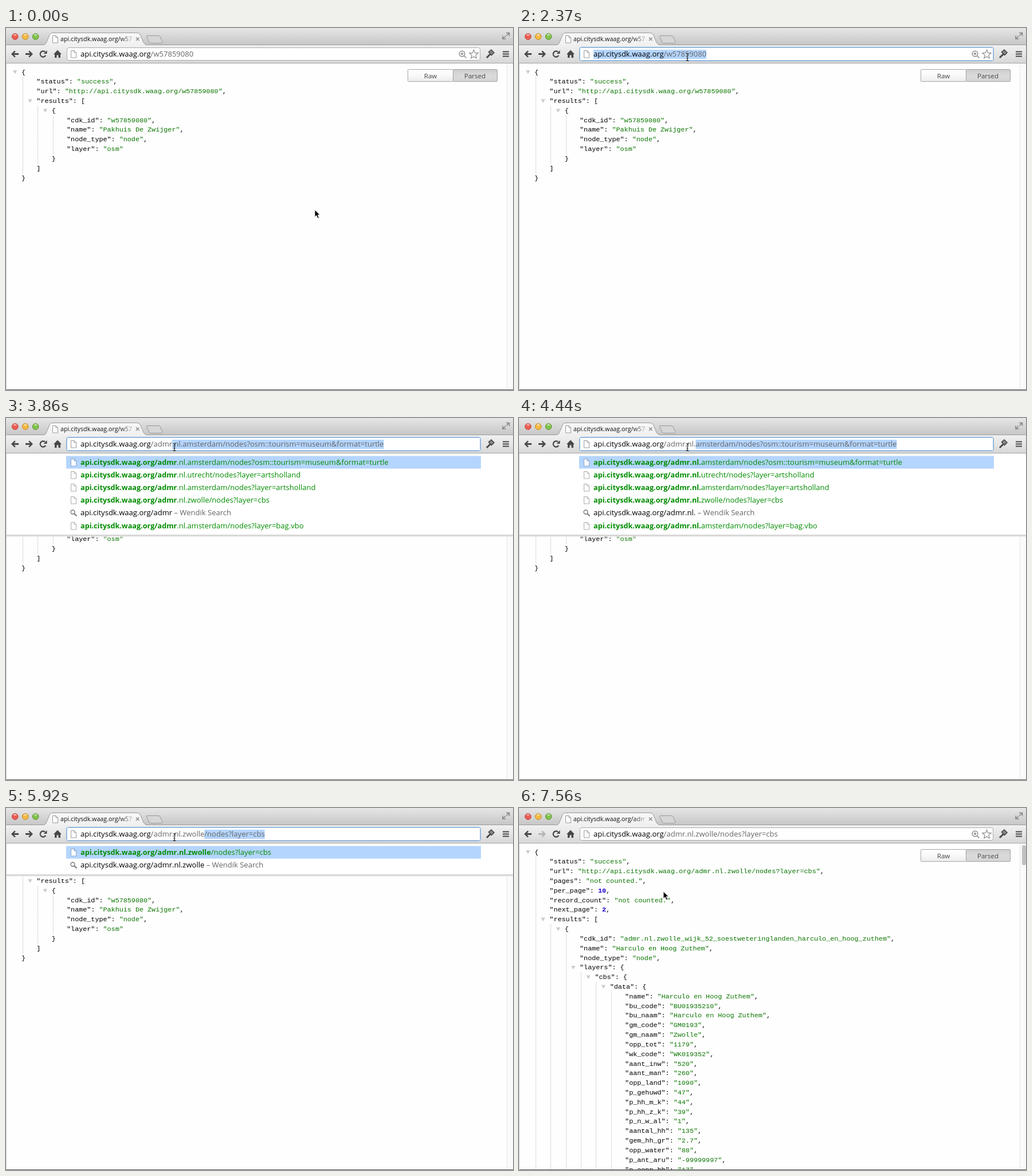
Write an HTML page with a canvas that moves like this. It is 885 by 633 pixels and loops after 8000 ms.

```html
<!DOCTYPE html>
<html lang="en">
<head>
<meta charset="utf-8">
<title>API browser</title>
<style>
  html, body { margin: 0; height: 100%; overflow: hidden; background: #fefefe; }
  canvas { display: block; }
</style>
</head>
<body>
<canvas id="stage" width="885" height="633"></canvas>
<script>
const ctx = document.getElementById('stage').getContext('2d');
const LOOP = 8000;
const UI = '"Open Sans", "Noto Sans", sans-serif';
const URL_FONT = '13.04px ' + UI;
const MATCH_FONT = 'bold 12.65px ' + UI;
const MONO = '11.76px "Liberation Mono", "Courier New", monospace';
const INK = '#484848', GREY = '#646464', GREEN = '#008c00', SELECT = '#b4d5fe';

const HOST = 'api.citysdk.waag.org';
const OLD_PATH = 'w57859080';
const NEW_PATH = 'admr.nl.zwolle/nodes?layer=cbs';
const HISTORY = [
  'admr.nl.amsterdam/nodes?osm::tourism=museum&format=turtle',
  'admr.nl.utrecht/nodes?layer=artsholland',
  'admr.nl.amsterdam/nodes?layer=artsholland',
  NEW_PATH,
  'admr.nl.amsterdam/nodes?layer=bag.vbo'
];

// Leading spaces give the nesting level.
const OLD_JSON = `{
 "status": "success",
 "url": "http://${HOST}/${OLD_PATH}",
 "results": [
  {
   "cdk_id": "w57859080",
   "name": "Pakhuis De Zwijger",
   "node_type": "node",
   "layer": "osm"
  }
 ]
}`.split('\n');

const FIELDS = {
  name: 'Harculo en Hoog Zuthem', bu_code: 'BU01935210', bu_naam: 'Harculo en Hoog Zuthem',
  gm_code: 'GM0193', gm_naam: 'Zwolle', opp_tot: '1179', wk_code: 'WK019352',
  aant_inw: '520', aant_man: '260', opp_land: '1090', p_gehuwd: '47', p_hh_m_k: '44',
  p_hh_z_k: '39', p_n_w_al: '1', aantal_hh: '135', gem_hh_gr: '2.7', opp_water: '88',
  p_ant_aru: '-99999997', p_eenp_hh: '17'
};
const NEW_JSON = `{
 "status": "success",
 "url": "http://${HOST}/${NEW_PATH}",
 "pages": "not counted.",
 "per_page": 10,
 "record_count": "not counted.",
 "next_page": 2,
 "results": [
  {
   "cdk_id": "admr.nl.zwolle_wijk_52_soestweteringlanden_harculo_en_hoog_zuthem",
   "name": "Harculo en Hoog Zuthem",
   "node_type": "node",
   "layers": {
    "cbs": {
     "data": {`.split('\n').concat(
  Object.entries(FIELDS).map(([key, value]) => `      "${key}": "${value}",`));

// [time, x, y]
const POINTER = [
  [0, 539, 318], [300, 533, 311], [450, 506, 282], [590, 467, 240], [740, 432, 203],
  [890, 415, 186], [1340, 394, 163], [1490, 368, 135], [1630, 338, 100], [1780, 312, 70],
  [1930, 298, 51], [2070, 294, 51], [7410, 276, 100], [7560, 252, 146]
];
// [time, text typed after the host]
const TYPED = [
  [2960, 'a'], [3410, 'ad'], [3710, 'adm'], [3850, 'admr'], [4000, 'admr.'],
  [4150, 'admr.n'], [4290, 'admr.nl'], [4440, 'admr.nl.'], [4740, 'admr.nl.z'],
  [5030, 'admr.nl.zw'], [5180, 'admr.nl.zwo'], [5470, 'admr.nl.zwol'],
  [5620, 'admr.nl.zwoll'], [5920, 'admr.nl.zwolle']
];
const FOCUS = 2220, SELECTED = 2370, ENTER = 6370, ARRIVED = 6660, DONE = 6810;

const latest = (steps, t) => steps.filter(step => step[0] <= t).pop();

function rect(x, y, w, h, fill) {
  ctx.fillStyle = fill;
  ctx.fillRect(x, y, w, h);
}
function shape(d, fill, stroke, width = 1) {
  const path = new Path2D(d);
  if (fill) { ctx.fillStyle = fill; ctx.fill(path); }
  if (stroke) { ctx.strokeStyle = stroke; ctx.lineWidth = width; ctx.stroke(path); }
}
function arc(x, y, r, from, to, fill, stroke, width = 1) {
  ctx.beginPath();
  ctx.arc(x, y, r, from, to);
  if (fill) { ctx.fillStyle = fill; ctx.fill(); }
  if (stroke) { ctx.strokeStyle = stroke; ctx.lineWidth = width; ctx.stroke(); }
}
const circle = (x, y, r, ...paint) => arc(x, y, r, 0, 2 * Math.PI, ...paint);
function box(x, y, w, h, r, fill, stroke) {
  ctx.beginPath();
  ctx.roundRect(x, y, w, h, r);
  ctx.fillStyle = fill;
  ctx.fill();
  if (stroke) { ctx.strokeStyle = stroke; ctx.lineWidth = 1; ctx.stroke(); }
}
function gradient(x0, y0, x1, y1, ...colors) {
  const g = ctx.createLinearGradient(x0, y0, x1, y1);
  colors.forEach((c, i) => g.addColorStop(i / (colors.length - 1), c));
  return g;
}
// Draws one run and returns where the next begins.
function text(str, x, y, font, color) {
  ctx.font = font;
  ctx.fillStyle = color;
  ctx.fillText(str, x, y);
  return x + ctx.measureText(str).width;
}
function widthOf(str) {
  ctx.font = URL_FONT;
  return ctx.measureText(str).width;
}
const pageIcon = (x, y, color = '#999') =>
  shape(`M${x + .5} ${y + .5}h5.5l3.5 3.5v9h-9zM${x + 6} ${y + .5}v3.5h3.5`, '#fff', color);

function drawJson(lines) {
  const open = [];
  lines.forEach((line, i) => {
    const level = line.search(/\S/);
    const top = 68.6 + 16.82 * i;
    let x = 27 + 26.35 * level;
    if (/^\s*[\]}]/.test(line)) drawGuide(level, open.pop(), top);
    if (/[\[{]$/.test(line)) {
      open.push(top + 16.82);
      shape(`M${x - 15} ${top + 5.5}h7.4l-3.7 6.5z`, '#ccc');
    }
    const parts = line.trim().split(/("[^"]*"|\b\d+\b)/);
    parts.forEach((part, n) => {
      const isToken = n % 2 && !parts[n + 1].startsWith(':');
      const isNumber = isToken && part[0] !== '"';
      const color = isNumber ? '#1a01cc' : isToken ? '#0b7500' : '#000';
      x = text(part, x, Math.round(top + 11.9), (isNumber ? 'bold ' : '') + MONO, color);
    });
  });
  open.forEach((top, level) => drawGuide(level, top, 632));
}
function drawGuide(level, top, bottom) {
  const x = Math.floor(29.3 + 26.4 * level);
  for (let y = Math.round(top); y < bottom; y += 2) rect(x, y, 1, 1, '#bbb');
}

function drawPage(arrived) {
  rect(0, 62, 885, 571, '#fefefe');
  drawJson(arrived ? NEW_JSON : OLD_JSON);
  rect(874, 62, 11, 570, '#fafafa');
  rect(874, 62, 1, 570, '#e6e6e6');
  if (arrived) box(878, 65, 7, 35, 3.5, '#c1c1c1');

  box(701.5, 72.5, 79, 21, 1, gradient(0, 73, 0, 94, '#fff', '#f8f8f8', '#ebebeb'), '#a5a5a5');
  box(780.5, 72.5, 77, 21, 1, gradient(0, 73, 0, 94, '#cecece', '#dadada', '#d4d4d4'), '#a0a0a0');
  ctx.textAlign = 'center';
  ctx.font = '11.5px ' + UI;
  ctx.fillStyle = '#444';
  ctx.fillText('Raw', 741, 88);
  ctx.fillText('Parsed', 818.5, 88);
  ctx.textAlign = 'left';
}

function drawSuggestions(typed) {
  const rows = HISTORY.filter(path => path.startsWith(typed));
  rows.splice(4, 0, null);
  const bottom = 72 + 22 * rows.length;
  rect(0, 62, 885, bottom - 62, '#fff');
  rect(0, bottom, 885, 5, gradient(0, bottom, 0, bottom + 5, '#d0d0d0', '#dedede', 'rgba(255,255,255,0)'));
  rect(105, 66.5, 724, 22, SELECT);
  rows.forEach((path, i) => {
    const y = 82 + Math.round(22.1 * i);
    if (path === null) {
      circle(116.5, y - 5.5, 3.5, null, '#777', 1.4);
      shape(`M119 ${y - 3}l4.5 4.5`, null, '#777', 2);
      const x = text(`${HOST}/${typed}`, 130, y, URL_FONT, '#000');
      text(' – Wendik Search', x, y, URL_FONT, GREY);
      return;
    }
    pageIcon(113, y - 11, i ? '#aaa' : '#8aa5c8');
    let x = text(`${HOST}/`, 130, y, MATCH_FONT, GREEN);
    // The entry below the search row marks every occurrence.
    const pieces = i > 4 ? path.split(typed) : ['', path.slice(typed.length)];
    pieces.forEach((piece, n) => {
      if (n) x = text(typed, x, y, MATCH_FONT, GREEN);
      x = text(piece, x, y, URL_FONT, GREEN);
    });
  });
}

function drawTab(t, loading, arrived) {
  rect(0, 0, 885, 30, gradient(0, 0, 0, 30, '#e6e6e6', '#d6d6d6', '#c6c6c6'));
  rect(0, 29, 885, 1, '#9a9a9a');
  [['#ee5c52', '#b8403a'], ['#f6b941', '#bd8526'], ['#80c34a', '#558f2c']].forEach(([fill, edge], i) => {
    const x = 15.8 + 17.9 * i;
    circle(x, 15, 5.3, fill, edge);
    arc(x, 13.2, 2.6, Math.PI, 2 * Math.PI, 'rgba(255,255,255,.55)');
  });
  shape('M64 30C70 29.5 70 26 72 22L76 12Q77.5 8.5 82 8.5H228Q233 8.5 234.5 12L239 23Q241 29.5 248 30',
    gradient(0, 8, 0, 30, '#f8f8f8', '#f0f0f0'), '#999');
  shape('M247 13.5H266Q268 13.5 269 15L273 24Q273 26.5 271 26.5H253Q251 26.5 250 25L245.5 15Q245 13.5 247 13.5Z',
    '#d6d6d6', '#999');
  if (loading) {
    const turn = -(t - ENTER) / 150;
    arc(86, 19, 5.3, turn - 1.9, turn, null, '#b3bfd2', 1.8);
  } else {
    pageIcon(81, 13);
  }
  ctx.save();
  ctx.beginPath();
  ctx.rect(95, 9, 125, 20);
  ctx.clip();
  text(`${HOST}/${arrived ? NEW_PATH : OLD_PATH}`, 95, 23, '10.7px ' + UI,
    gradient(200, 0, 224, 0, '#111', 'rgba(17,17,17,.1)'));
  ctx.restore();
  shape('M227 16.5l5.5 5.5m0-5.5l-5.5 5.5', null, '#888', 1.4);
  shape('M873 8.5h5.5v5.5M878 9l-4.5 4.5M872.5 19h-5.5v-5.5M867.5 18.5l4.5-4.5', null, '#858585', 1.5);
}

function drawToolbar(loading, arrived, focused, typing) {
  rect(0, 30, 885, 32, gradient(0, 30, 0, 62, '#f0f0f0', '#e5e5e5', '#d6d6d6'));
  rect(0, 61, 885, 1, '#a5a5a5');
  shape('M9 45.5l6-6 1.8 1.8-2.8 2.8h8v2.8h-8l2.8 2.8-1.8 1.8z', INK);
  shape('M47 45.5l-6-6-1.8 1.8 2.8 2.8h-8v2.8h8l-2.8 2.8 1.8 1.8z', arrived ? '#b5b5b5' : INK);
  if (loading) {
    shape('M60 40.5l10 10m0-10l-10 10', null, INK, 2.8);
  } else {
    arc(64.8, 45.5, 5, .5, 5.4, null, INK, 2.3);
    shape('M65.5 45h6v-6z', INK);
  }
  shape('M83 46l7-7.5 7 7.5h-2v6h-3.5v-4.5h-3v4.5h-3.5v-6z', INK);
  shape('M839 52l6.5-6.5', null, INK, 3);
  shape('M842.5 42l4.5-4 5 5-4.5 4.5z', '#888', INK, 1.6);
  [41, 45, 49].forEach(y => rect(867, y - .5, 11, 2, INK));

  if (focused) {
    box(105.5, 33.5, 723, 24, 3, '#fff', '#7fabd8');
    box(106.5, 34.5, 721, 22, 2, '#fff', '#a9c8e8');
  } else {
    box(106.5, 34.5, 721, 22, 3, '#fff', '#aaa');
  }
  pageIcon(113, 39);
  if (typing) return;
  circle(796, 45, 4.8, '#fff', '#888', 1.4);
  shape('M793.5 45h5M796 42.5v5M799.5 48.5l4 4', null, '#888', 1.5);
  let star = '';
  for (let i = 0; i < 10; i++) {
    const r = i % 2 ? 3.6 : 8, a = i * Math.PI / 5;
    star += `${i ? 'L' : 'M'}${816.5 + r * Math.sin(a)} ${46.3 - r * Math.cos(a)}`;
  }
  shape(star + 'z', '#fff', '#8c8c8c', 1.2);
}

function drawAddress(path, selectFrom) {
  const full = `${HOST}/${path}`;
  if (selectFrom !== null) {
    const start = 130 + widthOf(full.slice(0, selectFrom));
    rect(start, 38, 130 + widthOf(full) - start, 16, SELECT);
  }
  const x = text(HOST, 130, 50, URL_FONT, '#000');
  text('/' + path, x, 50, URL_FONT, GREY);
}

function drawPointer(t) {
  const [, x, y] = latest(POINTER, t);
  if (y < 62) {
    const beam = `M${x - 2.5} ${y - 6.5}q2.5 0 2.5 2v9q0 2-2.5 2M${x + 2.5} ${y - 6.5}q-2.5 0-2.5 2v9q0 2 2.5 2M${x - 1.5} ${y + 2}h3`;
    shape(beam, null, '#222', 1.1);
  } else {
    shape(`M${x} ${y}v12.5l2.9-2.7 2.2 5 2.3-1-2.2-4.9h4z`, '#000', '#fff', .9);
  }
}

function draw(t) {
  const loading = t >= ENTER && t < DONE;
  const arrived = t >= ARRIVED;
  const focused = t >= FOCUS && t < ENTER;
  const step = t < ENTER && latest(TYPED, t);
  const typed = step ? step[1] : '';

  drawPage(arrived);
  if (typed) drawSuggestions(typed);
  drawTab(t, loading, arrived);
  drawToolbar(loading, arrived, focused, typed);
  if (typed) {
    drawAddress(HISTORY.find(path => path.startsWith(typed)), HOST.length + 1 + typed.length);
  } else {
    drawAddress(t >= ENTER ? NEW_PATH : OLD_PATH, focused && t >= SELECTED ? 0 : null);
  }
  rect(0, 632, 885, 1, '#555');
  rect(0, 62, 1, 571, '#d0d0d0');
  drawPointer(t);
}

function tick() {
  draw(performance.now() % LOOP);
  requestAnimationFrame(tick);
}
tick();
</script>
</body>
</html>
```
